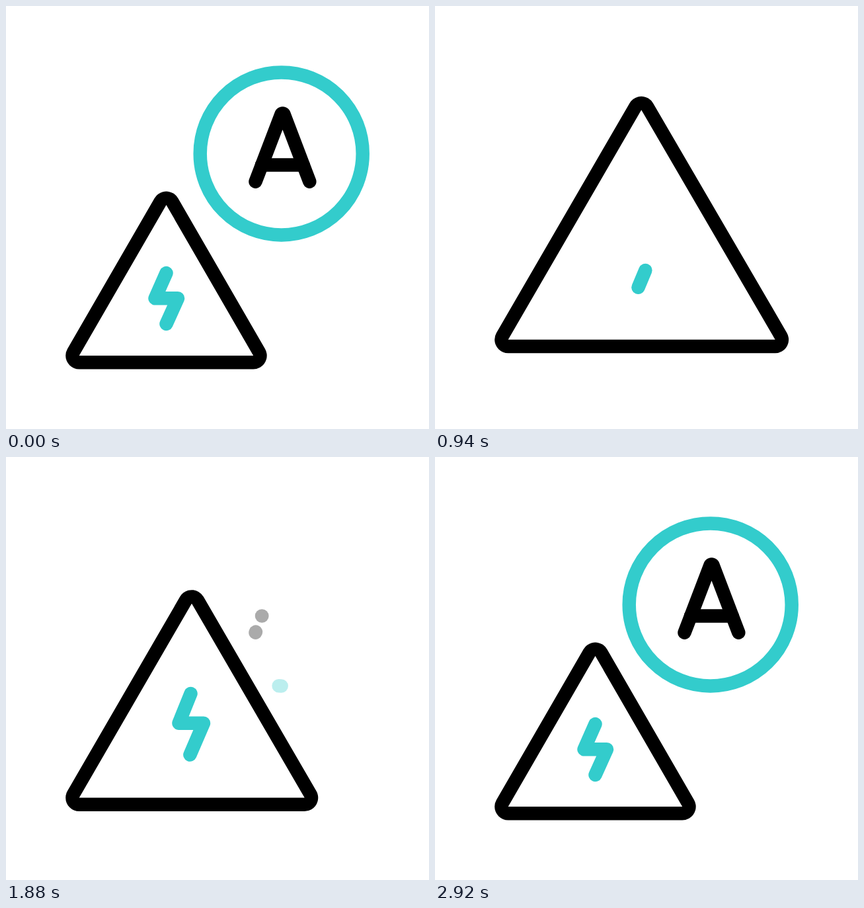
These frames come from a looping animation (640 by 640 pixels, 3620 ms). An HTML page:

```html
<!DOCTYPE html>
<html>
<head>
<meta charset="utf-8">
<style>
  html, body { margin: 0; width: 100%; height: 100%; overflow: hidden; background: #fff; }
  svg { display: block; width: 100vw; height: 100vh; }
  path { fill: none; stroke: #000; stroke-width: 20.5; stroke-linecap: round; stroke-linejoin: round; }
  .teal { stroke: #3cc; }
  #rim { stroke-width: 41; }
  #face { fill: #fff; stroke: none; }
</style>
</head>
<body>
<svg viewBox="0 0 640 640">
  <path id="rim"/>
  <path id="face"/>
  <path id="bolt" class="teal" pathLength="1"/>
  <g id="sign">
    <path class="teal" pathLength="1" d="M416.7 346.4A123 123 0 0 1 416.7 100.4A123 123 0 0 1 416.7 346.4"/>
    <path pathLength="1" d="M377.5 265.7L416.6 163.4Q418.5 161.6 420.4 163.4L459.3 265.7"/>
    <path pathLength="1" d="M387 240.4H449.5"/>
  </g>
</svg>
<script>
const LOOP = 3620;
const byId = id => document.getElementById(id);
const rim = byId('rim'), face = byId('face'), bolt = byId('bolt'), sign = byId('sign');

// Each shape: points when small, points when large
const triangle = [
  [[110.7, 529], [242.5, 301], [374.2, 529]],
  [[110.7, 502.2], [319.5, 142.3], [529.3, 502.2]]
];
const zigzag = [
  [[242.5, 404], [225.5, 442.3], [260, 442.3], [242.5, 481]],
  [[316.5, 312], [297.5, 363], [338, 363], [314.3, 420]]
];

const ramp = (t, start, span) => Math.min(1, Math.max(0, (t - start) / span));
const smooth = p => p * p * (3 - 2 * p);

// Quick start with a long settling tail
function settle(p) {
  if (p <= 0 || p >= 1) return p;
  let lo = 0, hi = 1;
  for (let i = 0; i < 30; i++) {
    const s = (lo + hi) / 2, r = 1 - s;
    if (0.75 * r * r * s - 0.39 * r * s * s + s ** 3 < p) lo = s; else hi = s;
  }
  return smooth(lo);
}

const blend = ([small, large], k) => 'M' + small.map((point, i) =>
  point.map((v, j) => v + (large[i][j] - v) * k).join(' ')).join('L');

function trim(path, from, to) {
  path.style.strokeDasharray = `${to - from} 2`;
  path.style.strokeDashoffset = -from;
}

function draw(t) {
  const size = settle(ramp(t, 422, 1026)) * (1 - smooth(ramp(t, 1560, 640)));
  const outline = blend(triangle, size) + 'Z';
  rim.setAttribute('d', outline);
  face.setAttribute('d', outline);
  bolt.setAttribute('d', blend(zigzag, size));

  const redraw = t >= 1060;
  const from = redraw ? 0 : smooth(ramp(t, 620, 440));
  const to = redraw ? smooth(ramp(t, 1060, 440)) : 1;
  trim(bolt, from, to);
  bolt.style.opacity = to - from > 0.001 ? 1 : 0;

  const shown = t < 1000 ? 1 - smooth(ramp(t, 0, 647)) : settle(ramp(t, 1854, 900));
  for (const path of sign.children) {
    trim(path, 0, shown);
    path.style.opacity = t < 1000 ? 1 - ramp(t, 549, 80) : ramp(t, 1854, 78);
  }
}

function tick() {
  const t = performance.now() % LOOP;
  draw(Math.floor(t / 20) * 20);
  requestAnimationFrame(tick);
}
tick();
</script>
</body>
</html>
```
